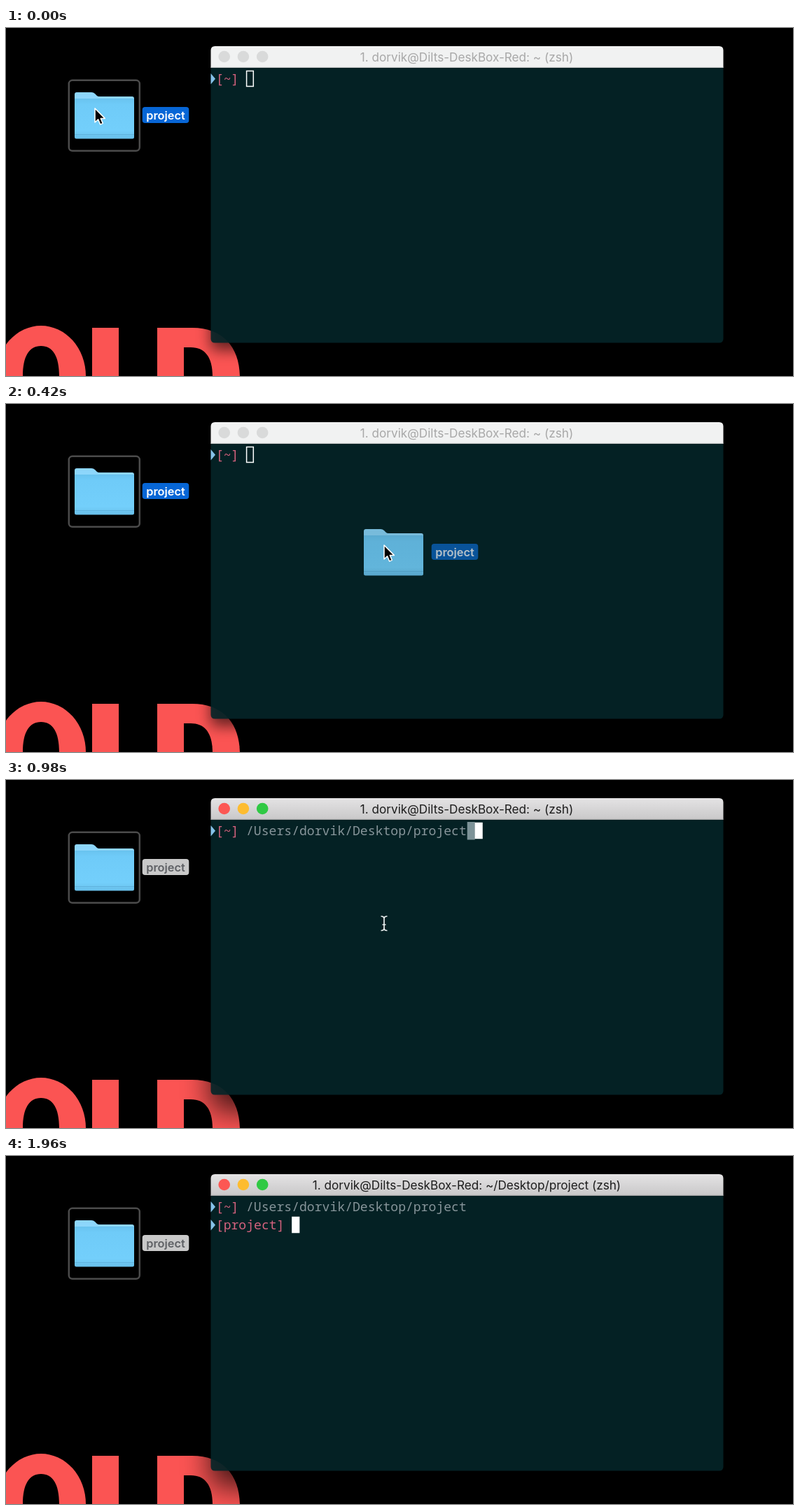
An HTML page for the animation above (2100 ms loop, 1124 by 498 pixels).

```html
<!DOCTYPE html>
<html lang="en">
<head>
<meta charset="utf-8">
<title>Drag a folder into the terminal</title>
<style>
  html, body { margin: 0; width: 100%; height: 100%; overflow: hidden; background: #000; }
  svg { display: block; width: 1124px; height: 498px; }
  text { white-space: pre; }
  .title { font: 17.15px Inter, sans-serif; text-anchor: middle; }
  .mono { font: 18.1px "Noto Sans Mono", monospace; }
  .label { font: 600 16.4px Inter, sans-serif; text-anchor: middle; }
  .red { fill: #d5627e; }
  .path { fill: #87959a; }
</style>
</head>
<body>
<svg viewBox="0 0 1124 498">
  <defs>
    <linearGradient id="front" x2="0" y2="1">
      <stop offset="0" stop-color="#69c3ef"/>
      <stop offset=".15" stop-color="#6fcbf8"/>
      <stop offset=".8" stop-color="#73cffb"/>
      <stop offset="1" stop-color="#68bfe9"/>
    </linearGradient>
    <linearGradient id="bar" x2="0" y2="1">
      <stop offset="0" stop-color="#e4e3e4"/>
      <stop offset="1" stop-color="#c9c8c9"/>
    </linearGradient>
    <filter id="soft" x="-20%" y="-30%" width="140%" height="160%">
      <feGaussianBlur stdDeviation="10"/>
    </filter>
    <filter id="deep" x="-20%" y="-30%" width="140%" height="160%">
      <feGaussianBlur stdDeviation="21"/>
    </filter>
    <g id="folder">
      <path d="M98 104V95Q98 92 101 92H122Q125 92 127 94L130 97Q131 98 133 98H180Q183 98 183 101V110H98Z" fill="#8dd6fb"/>
      <path d="M98 101H183V156Q183 158.500 180.500 158.500H100.500Q98 158.500 98 156Z" fill="url(#front)"/>
      <path d="M98 152.500H183" stroke="#5fb3dd" stroke-width="1"/>
    </g>
  </defs>

  <!-- wallpaper lettering -->
  <g fill="#fb5453" fill-rule="evenodd">
    <path d="M-14 498A64 72 0 0 1 114 498V510H-14ZM24 510V498C24 470 33 455 50 455S76 470 76 498V510Z"/>
    <path d="M123 429H161V510H123Z"/>
    <path d="M216 429H266C310 429 334 457 334 500V510H216ZM254 457V510H295V498C295 471 284 457 264 457Z"/>
  </g>

  <rect id="shade" x="292.500" width="732" height="424" rx="6"/>

  <!-- terminal window -->
  <path d="M292.500 56H1024.500V444.500Q1024.500 450.500 1018.500 450.500H298.500Q292.500 450.500 292.500 444.500Z" fill="#052529" fill-opacity=".9"/>
  <path id="head" d="M292.500 56.500V32Q292.500 26 298.500 26H1018.500Q1024.500 26 1024.500 32V56.500Z"/>
  <path id="rule" d="M292.500 56.300H1024.500" stroke-width="1.200"/>
  <g id="lights">
    <circle cx="311.700" cy="41" r="8.300"/>
    <circle cx="338.900" cy="41" r="8.300"/>
    <circle cx="366.200" cy="41" r="8.300"/>
  </g>
  <text id="title" class="title" x="658" y="47.500"></text>

  <path d="M292.500 65L299 72.700L292.500 80.500Z" fill="#86c3ea"/>
  <text class="mono red" x="299.800" y="79">[~]</text>
  <text id="path" class="mono path" x="343" y="79">/Users/dorvik/Desktop/project</text>
  <rect id="mark" x="658.700" y="60" width="11" height="25.500" fill="#7d9398"/>
  <g id="prompt">
    <path d="M292.500 91L299 98.700L292.500 106.500Z" fill="#86c3ea"/>
    <text class="mono red" x="299.800" y="105">[project]</text>
  </g>
  <rect id="caret" stroke="#fff" stroke-width="1.500" width="9.700" height="22"/>

  <!-- desktop item -->
  <rect x="89.800" y="74.800" width="101" height="101" rx="5" fill="none" stroke="#4b4b4b" stroke-width="2.500"/>
  <use href="#folder"/>
  <rect id="tag" x="194.700" y="113" width="66.600" height="23" rx="4"/>
  <text id="name" class="label" x="228" y="130.800">project</text>

  <g id="ghost" opacity=".85">
    <use href="#folder"/>
    <rect x="194.700" y="113" width="66.600" height="23" rx="4" fill="#0a5cae"/>
    <text class="label" x="228" y="130.800" fill="#d5dde6">project</text>
  </g>

  <path id="arrow" d="M0 0V20L4.600 15.800L7.600 23L11.300 21.400L8.300 14.400H14.300Z" fill="#000" stroke="#fff" stroke-width="1.500" stroke-linejoin="round"/>
  <path id="beam" d="M535.500 195Q540 195 540 198.500Q540 195 544.500 195M540 198V212M535.500 215.500Q540 215.500 540 212Q540 215.500 544.500 215.500M537.500 207H542.500" fill="none" stroke="#e9eeee" stroke-width="1.700"/>
</svg>

<script>
const LOOP = 2100, STEP = 70;
const LIFT = 70, DROP = 490, FOCUS = 840, ENTER = 1400, READY = 1470;
const HOST = "1. dorvik@Dilts-DeskBox-Red: ~";

// time, dx, dy since the grab
const pointer = [[0, 0, 0], [70, 34, 6], [140, 94, 18], [280, 398, 83], [350, 411, 86], [420, 413, 87]];
const folder = [[0, 0, 0], [70, 20, 4], [140, 75, 14], [280, 376, 79], [350, 405, 85], [420, 413, 87]];

const $ = id => document.getElementById(id);
const show = (id, on) => $(id).setAttribute("visibility", on ? "visible" : "hidden");
const set = (id, attrs) => {
  for (const key in attrs) $(id).setAttribute(key, attrs[key]);
};

function along(track, t) {
  const i = track.findIndex(k => k[0] > t);
  if (i < 0) return track[track.length - 1].slice(1);
  const a = track[i - 1], b = track[i];
  const p = (t - a[0]) / (b[0] - a[0]);
  return [1, 2].map(n => a[n] + (b[n] - a[n]) * p);
}

function caretAt(t) {
  if (t < DROP) return [343.6, 61.5];
  if (t < ENTER) return [670.3, 61.5];
  return t < READY ? [300.1, 87.5] : [408.9, 87.5];
}

function titleAt(t) {
  if (t < ENTER) return HOST + " (zsh)";
  if (t < READY) return "1. /Users/dorvik/Desktop/project (zsh)";
  return HOST + "/Desktop/project (zsh)";
}

function draw(t) {
  const active = t >= FOCUS;
  const [px, py] = along(pointer, t);
  const [fx, fy] = along(folder, t);
  const [cx, cy] = caretAt(t);

  set("arrow", { transform: `translate(${127 + px} ${115 + py})` });
  set("ghost", { transform: `translate(${fx} ${fy})` });
  set("caret", { x: cx, y: cy, fill: active ? "#fff" : "none" });
  show("arrow", !active);
  show("ghost", t >= LIFT && t < DROP);
  show("beam", active && t < ENTER);
  show("path", t >= DROP);
  show("mark", t >= DROP && t < ENTER);
  show("prompt", t >= READY);

  set("shade", active
    ? { y: 49, filter: "url(#deep)", opacity: .75 }
    : { y: 37, filter: "url(#soft)", opacity: .6 });
  set("head", { fill: active ? "url(#bar)" : "#f1f2f2" });
  set("rule", { stroke: active ? "#a5a5a5" : "#c6c8c8" });
  const colors = active ? ["#fc5753", "#fdbc30", "#30c944"] : Array(3).fill("#d9dada");
  [...$("lights").children].forEach((c, i) => c.setAttribute("fill", colors[i]));
  set("title", { fill: active ? "#1d1d1d" : "#a8a8a8" });
  set("tag", { fill: active ? "#c9c9c9" : "#0766d6" });
  set("name", { fill: active ? "#5f6165" : "#fff" });

  const title = titleAt(t);
  if ($("title").textContent !== title) $("title").textContent = title;
}

const start = performance.now();
function tick() {
  const t = (performance.now() - start) % LOOP;
  draw(Math.floor(t / STEP) * STEP);
  requestAnimationFrame(tick);
}
draw(0);
requestAnimationFrame(tick);
</script>
</body>
</html>
```
